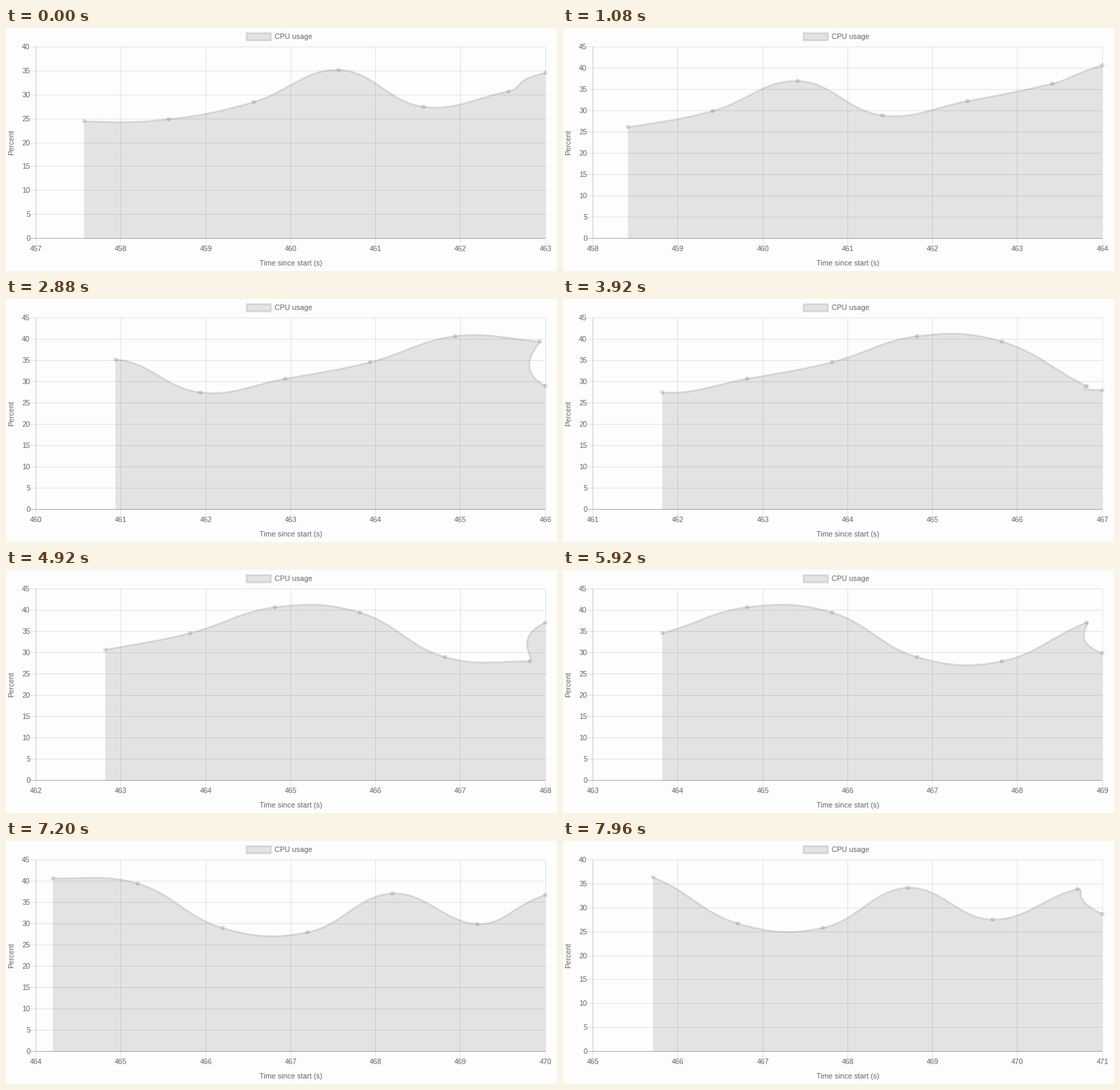
Write a matplotlib script that moves like this. It is 800 px wide and 354 px high and loops after 8 s.

```python
import math

import matplotlib.pyplot as plt
import numpy as np
from matplotlib.animation import FuncAnimation
from matplotlib.patches import Circle, PathPatch, Rectangle
from matplotlib.path import Path

WIDTH, HEIGHT, DPI = 800, 354, 64
PX = 72 / DPI                # one pixel in points
UNIT = 0.882                 # one chart unit in pixels
LEFT, RIGHT, TOP, BASE = 43.7, 783.2, 27.5, 306.5
STEP = (RIGHT - LEFT) / 6
TICK = 10 * UNIT
TENSION = 0.4
INTERVAL, FRAMES = 40, 200

SHADE = (0, 0, 0, 0.1)
ZERO_SHADE = (0, 0, 0, 0.25)
TEXT = "#666666"

FIRST_SECOND = 457
# One reading per second, starting one second before the first window.
READINGS = [28, 24.5, 24.9, 28.5, 35.2, 27.5, 30.7, 34.6,
            40.7, 39.45, 29.0, 28.0, 37.1, 29.9, 36.8, 28.72]
# Times in ms at which a new reading arrives.
ARRIVALS = [-134, 878, 1866, 2860, 3866, 4866, 5866, 6866, 7873]


def crisp(v):
    return math.floor(v) + 0.5


def window(k):
    return READINGS[k + 1:k + 8]


def axis_max(k):
    return 5 * math.ceil(max(window(k)) / 5)


def settled(k):
    """Resting points of window k with both control points: shape (7, 3, 2)."""
    scale = (BASE - TOP) / axis_max(k)
    pts = np.array([(LEFT + i * STEP, BASE - v * scale)
                    for i, v in enumerate(window(k))])
    out = []
    for i, cur in enumerate(pts):
        prev, nxt = pts[max(i - 1, 0)], pts[min(i + 1, 6)]
        before, after = math.dist(prev, cur), math.dist(cur, nxt)
        pull = TENSION * (nxt - prev) / (before + after)
        out.append((cur - pull * before, cur, cur + pull * after))
    return np.array(out)


def pose(k, progress):
    """The newest point is placed at once, the others ease from their old place."""
    now = settled(k)
    old = settled(k - 1)[1:]
    now[:-1] = old + (now[:-1] - old) * progress
    return now


def state(ms):
    """Window index and eased progress; the animation advances in 1/60 steps."""
    for k in reversed(range(len(ARRIVALS))):
        tick = math.floor((ms - ARRIVALS[k]) * 60 / 1000)
        if tick >= 1:
            return k, 1 - (1 - min(tick / 60, 1)) ** 4


plt.rcParams["font.family"] = "Liberation Sans"
fig = plt.figure(figsize=(WIDTH / DPI, HEIGHT / DPI), dpi=DPI,
                 facecolor="#fefdfe")
ax = fig.add_axes([0, 0, 1, 1])
ax.set_xlim(0, WIDTH)
ax.set_ylim(HEIGHT, 0)
ax.axis("off")


def rule(xs, ys, color=SHADE):
    return ax.plot(xs, ys, color=color, lw=0.95 * PX, snap=False,
                   solid_capstyle="butt", zorder=1)[0]


def label(x, y, text="", ha="center", **kw):
    return ax.text(x, y, text, ha=ha, va="baseline", color=TEXT,
                   fontsize=12 * UNIT * PX, **kw)


def patch(shape, zorder):
    shape.set_zorder(zorder)
    return ax.add_patch(shape)


# Legend and axis titles
patch(Rectangle((349.3, 7.5), 40 * UNIT, 12 * UNIT, fc=SHADE, ec=SHADE,
                lw=3 * UNIT * PX, snap=False, joinstyle="miter"), 2)
label(389.8, 16.3, "CPU usage", ha="left")
label(413.5, 346, "Time since start (s)")
label(11.5, 166.8, "Percent", rotation=90, rotation_mode="anchor")

# Grid
x_labels = []
for i in range(7):
    x = LEFT + i * STEP
    rule([crisp(x)] * 2, [TOP, BASE + TICK])
    x_labels.append(label(x, 325))
rule([crisp(LEFT)] * 2, [TOP, BASE])
rule([LEFT, RIGHT], [BASE, BASE])
rule([LEFT - TICK, RIGHT], [BASE, BASE], ZERO_SHADE)
label(35, BASE + 3.7, "0", ha="right")
y_rules = [rule([LEFT - TICK, RIGHT], [TOP, TOP]) for _ in range(9)]
y_labels = [label(35, TOP, ha="right") for _ in range(9)]

# Data
EMPTY = Path([(0, 0), (0, 0)])
area = patch(PathPatch(EMPTY, fc=SHADE, ec="none", lw=0), 3)
curve = patch(PathPatch(EMPTY, fc="none", ec=SHADE, lw=3 * UNIT * PX,
                        capstyle="butt", joinstyle="miter"), 4)
clip = Rectangle((LEFT, TOP), RIGHT - LEFT, BASE - TOP,
                 transform=ax.transData)
for shape in (area, curve):
    shape.set_clip_path(clip)
dots = [patch(Circle((0, 0), 3 * UNIT, fc=SHADE, ec=SHADE, lw=UNIT * PX), 5)
        for _ in range(7)]


def draw(frame):
    k, progress = state(frame * INTERVAL)

    for i, text in enumerate(x_labels):
        text.set_text(str(FIRST_SECOND + k + i))
    top = axis_max(k)
    for i, (line, text) in enumerate(zip(y_rules, y_labels), 1):
        shown = 5 * i <= top
        y = BASE - (BASE - TOP) * 5 * i / top
        line.set_visible(shown)
        text.set_visible(shown)
        line.set_ydata([crisp(y)] * 2)
        text.set_y(crisp(y) + 3.7)
        text.set_text(str(5 * i))

    points = pose(k, progress)
    verts = points.reshape(-1, 2)[1:-1]
    codes = [Path.MOVETO] + [Path.CURVE4] * 18
    curve.set_path(Path(verts, codes))
    first, last = verts[0], verts[-1]
    corners = [(last[0], BASE), (first[0], BASE), first]
    area.set_path(Path(np.vstack([verts, corners]),
                       codes + [Path.LINETO] * 2 + [Path.CLOSEPOLY]))
    for dot, point in zip(dots, points):
        dot.center = point[1]
    return []


anim = FuncAnimation(fig, draw, frames=FRAMES, interval=INTERVAL,
                     repeat=True, repeat_delay=0, blit=False)
plt.show()
```
